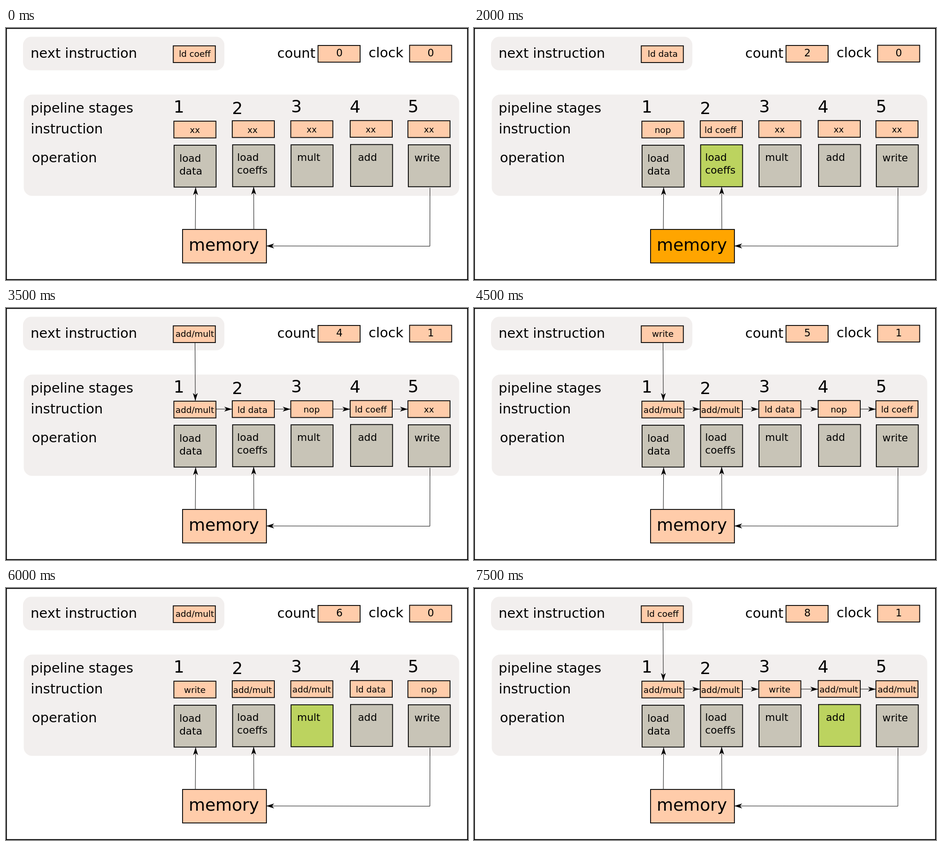
Recreate the animation shown at these times as an HTML page. Size 976x533 px, loop 8 s.

```html
<!DOCTYPE html>
<html lang="en">
<head>
<meta charset="utf-8">
<title>Instruction pipeline</title>
<style>
  html, body { margin: 0; width: 100%; height: 100%; overflow: hidden; background: #fff; }
  svg { display: block; font-family: "DejaVu Sans", sans-serif; }
  .panel { fill: #f2efee; }
  .box { fill: #fca; stroke: #000; stroke-width: 1.78; }
  .wire { fill: none; stroke: #000; stroke-width: .95; }
  .mid { text-anchor: middle; }
</style>
</head>
<body>
<svg id="stage" width="976" height="533" viewBox="0 0 976 533"></svg>
<script>
const STEP = 500, STEPS = 16;
const PEACH = '#ffccaa', GREY = '#c8c4b7', GREEN = '#bcd35f', ORANGE = '#ffa500';
const SMALL = 18.2, MEDIUM = 21.5, LARGE = 28.6, HUGE = 35.6;
const program = ['ld coeff', 'nop', 'ld data', 'add/mult', 'add/mult', 'write',
                 'add/mult', 'add/mult', 'ld coeff'];

const svg = document.getElementById('stage');

function add(tag, attrs, parent = svg) {
  const el = document.createElementNS('http://www.w3.org/2000/svg', tag);
  for (const key in attrs) el.setAttribute(key, attrs[key]);
  return parent.appendChild(el);
}
const rect = (x, y, width, height, more = { class: 'box' }) =>
  add('rect', { x, y, width, height, ...more });

function text(x, y, size, content, cls = '') {
  const el = add('text', { x, y, 'font-size': size, class: cls });
  el.textContent = content;
  return el;
}

// Polyline through the points with an arrowhead at the last one
function arrow(points, parent = svg) {
  const [[ax, ay], [x, y]] = points.slice(-2);
  const angle = Math.atan2(y - ay, x - ax) * 180 / Math.PI;
  add('polyline', { points: points.join(' '), class: 'wire' }, parent);
  add('path', { d: 'M0 0L-16.5 -5.2L-12 0L-16.5 5.2Z',
                transform: `translate(${x} ${y}) rotate(${angle})` }, parent);
}

rect(.9, .9, 974.2, 531.2, { fill: '#fff', stroke: '#000', 'stroke-width': 1.8 });
rect(36, 18.5, 425.3, 71, { class: 'panel', rx: 17.5 });
rect(37.5, 140.8, 920, 214.2, { class: 'panel', rx: 17.5 });

text(52, 63, LARGE, 'next instruction');
text(573, 63, LARGE, 'count');
text(766, 62, LARGE, 'clock');
text(52, 179, LARGE, 'pipeline stages');
text(52.2, 223, LARGE, 'instruction');
text(54.8, 284, LARGE, 'operation');

rect(353.4, 37.7, 88.9, 35.4);
rect(659.2, 36.9, 88.9, 35.4);
rect(852.6, 36.5, 88.9, 35.4);
const next = text(398.8, 61, SMALL, '', 'mid');
const count = text(704.3, 60, MEDIUM, '', 'mid');
const clock = text(897.3, 60, MEDIUM, '', 'mid');

// num: stage number, reg: instruction box, op: operation box; trigger lights the stage
const stages = [
  { num: [354, 179], reg: [354.6, 197.1], label: [398.9, 222], op: [355.1, 247.9],
    lines: ['load', 'data'], at: [366.2, 283.2], trigger: 'ld data', memory: true },
  { num: [477.5, 181.5], reg: [478, 196.2], label: [520.7, 222], op: [478.7, 247.1],
    lines: ['load', 'coeffs'], at: [488.3, 281.4], trigger: 'ld coeff', memory: true },
  { num: [602.3, 178], reg: [601.6, 196.2], label: [645.7, 221], op: [602.2, 247.1],
    lines: ['mult'], at: [615, 281.4], trigger: 'add/mult' },
  { num: [726.3, 178.5], reg: [727.1, 195.7], label: [770.6, 221], op: [727.9, 246.5],
    lines: ['add'], at: [743.4, 281.4], trigger: 'add/mult' },
  { num: [849, 178.3], reg: [849.1, 196.2], label: [893.6, 221], op: [849.9, 247.1],
    lines: ['write'], at: [862.8, 282], trigger: 'write', memory: true },
];
stages.forEach((s, i) => {
  text(...s.num, HUGE, i + 1);
  rect(...s.reg, 88.9, 35.4);
  s.block = rect(...s.op, 88.7, 88.6);
  s.lines.forEach((line, n) => text(s.at[0], s.at[1] + 27 * n, MEDIUM, line));
  s.content = text(...s.label, SMALL, '', 'mid');
});

const memory = rect(373, 426.1, 177.2, 70.8);
text(386, 471, HUGE, 'memory');
arrow([[400, 425], [400.6, 337]]);
arrow([[523.6, 425], [523.2, 336]]);
arrow([[895.7, 338], [895.5, 461.5], [550, 461]]);

// Transfers shown while the clock is high
const pulse = add('g', {});
arrow([[399.3, 73], [400, 196.3]], pulse);
for (const [from, to] of [[443.5, 477.5], [567, 601], [690.5, 727], [816, 848.8]])
  arrow([[from, 213.8], [to, 213.9]], pulse);

function draw(now) {
  const step = Math.floor(now / STEP) % STEPS;
  const cycle = Math.ceil(step / 2), high = step % 2;
  let memoryBusy = false;

  next.textContent = program[cycle];
  count.textContent = cycle;
  clock.textContent = high;
  pulse.style.display = high ? '' : 'none';

  stages.forEach((s, i) => {
    const held = program[cycle - 1 - i] || 'xx';
    const active = held === s.trigger;
    s.content.textContent = held;
    s.block.style.fill = active ? GREEN : GREY;
    if (active && s.memory) memoryBusy = true;
  });
  memory.style.fill = memoryBusy ? ORANGE : PEACH;
}

const start = performance.now();
function tick() {
  draw(performance.now() - start);
  requestAnimationFrame(tick);
}
tick();
</script>
</body>
</html>
```
